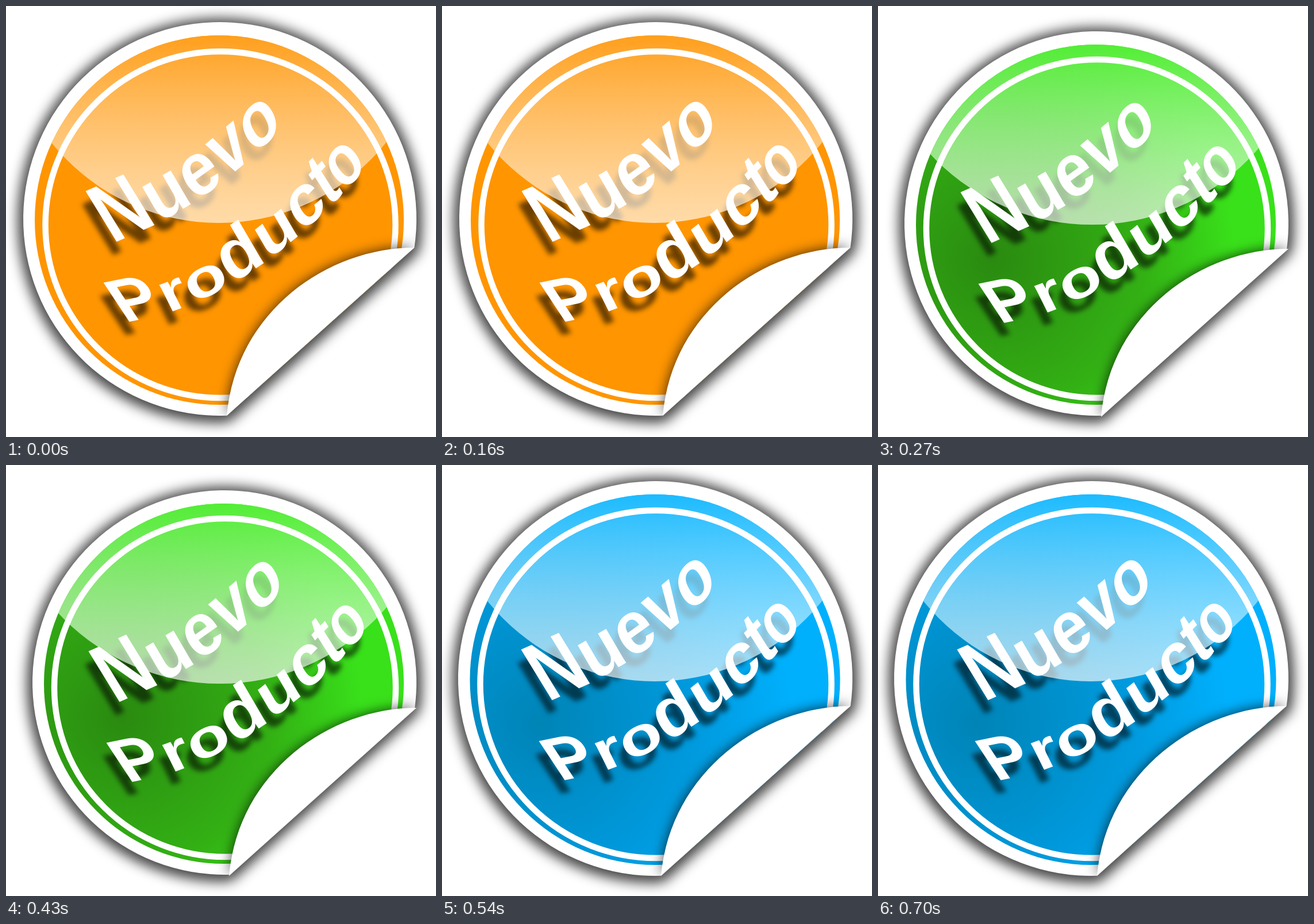
An HTML page with a canvas for the animation above (810 ms loop, 748x749 px).

```html
<!DOCTYPE html>
<html lang="es">
<head>
<meta charset="utf-8">
<title>Nuevo Producto</title>
<style>
html, body { margin: 0; width: 100%; height: 100%; overflow: hidden; background: #fff; }
canvas { display: block; }
</style>
</head>
<body>
<canvas id="stage" width="748" height="749"></canvas>
<script>
const ctx = document.getElementById('stage').getContext('2d');
const HOLD = 270;
const FONT = 'bold 100px "Liberation Sans", Arial, sans-serif';
const CAP = 68.8; // cap height at 100px

// disc, face, gloss: [x, y, r]; ring: [x, y, rx, ry]; curl: its two tips
const stickers = [
  { disc: [372, 370, 342], face: [371, 372, 321], ring: [373, 380, 304.5, 301],
    gloss: [370, 4, 373], curl: [[710, 420], [384, 712]], shift: [0, 0],
    glow: [200, 440, 420], colors: ['#ff9500', '#ff9500', '#ff9500'], shine: '#ffa01f' },
  { disc: [380, 378, 334], face: [379, 380, 313], ring: [381, 387, 297, 294],
    gloss: [372, -3.5, 383.5], curl: [[714, 422], [388, 714]], shift: [5, 2],
    glow: [200, 440, 420], colors: ['#2a8a10', '#33b014', '#39e11a'], shine: '#55ef38' },
  { disc: [371, 371, 343], face: [370.5, 373, 322], ring: [372, 381, 305.5, 302],
    gloss: [370, 3, 373], curl: [[710, 419], [381, 714]], shift: [-1, -1],
    glow: [170, 450, 440], colors: ['#0084b6', '#009ade', '#00b0fd'], shine: '#1fbcff' },
];

// base: cubic baseline; stems: downward cap-height vector of each letter
const words = [
  { text: 'Nuevo',
    base: [[184, 412], [303, 368], [400, 297], [482, 209]],
    stems: [[54, 88], [45, 77], [46, 75], [46, 80], [42, 76]] },
  { text: 'Producto',
    base: [[207, 548], [372, 534], [540, 384], [628, 278]],
    stems: [[45, 68], [30, 60], [29, 57], [42, 72], [37, 63], [42, 70], [47, 74], [50, 64]] },
];

function cubic(points, t) {
  const s = 1 - t;
  const at = i => {
    const [a, b, c, d] = points.map(p => p[i]);
    return [
      s * s * s * a + 3 * s * s * t * b + 3 * s * t * t * c + t * t * t * d,
      3 * (s * s * (b - a) + 2 * s * t * (c - b) + t * t * (d - c)),
    ];
  };
  const [x, dx] = at(0), [y, dy] = at(1);
  return { x, y, dx, dy };
}

function drawWord({ text, base, stems }) {
  ctx.font = FONT;
  ctx.textAlign = 'center';
  const widths = [...text].map(c => ctx.measureText(c).width);
  const total = widths.reduce((a, b) => a + b);
  let start = 0;
  widths.forEach((width, i) => {
    const p = cubic(base, (start + width / 2) / total);
    const [sx, sy] = stems[i];
    ctx.save();
    ctx.transform(p.dx / total, p.dy / total, sx / CAP, sy / CAP, p.x, p.y);
    ctx.fillText(text[i], 0, 0);
    ctx.restore();
    start += width;
  });
}

function drawText([dx, dy]) {
  ctx.save();
  ctx.translate(dx, dy);
  words.forEach(drawWord);
  ctx.restore();
}

// Draws only the shadow: the shape itself lies outside the stage.
function cast(alpha, blur, dx, dy, draw) {
  const away = 2000;
  ctx.save();
  ctx.shadowColor = `rgba(0,0,0,${alpha})`;
  ctx.shadowBlur = blur;
  ctx.shadowOffsetX = dx + away;
  ctx.shadowOffsetY = dy;
  ctx.translate(-away, 0);
  ctx.fillStyle = ctx.strokeStyle = '#000';
  draw();
  ctx.restore();
}

function circle([x, y, r]) {
  const path = new Path2D();
  path.arc(x, y, r, 0, 2 * Math.PI);
  return path;
}

function discPath([x, y, r], [a, b]) {
  const angle = p => Math.atan2(p[1] - y, p[0] - x);
  const path = new Path2D();
  path.arc(x, y, r, angle(b), angle(a));
  path.closePath();
  return path;
}

function curlPath([[ax, ay], [bx, by]]) {
  const path = new Path2D();
  path.moveTo(ax, ay);
  path.bezierCurveTo(ax - 150, ay, bx + 16, by - 182, bx, by);
  path.closePath();
  return path;
}

function draw(s) {
  const disc = discPath(s.disc, s.curl), face = circle(s.face), curl = curlPath(s.curl);
  ctx.fillStyle = '#fff';
  ctx.fillRect(0, 0, 748, 749);

  cast(0.85, 25, 0, 3, () => {
    ctx.lineWidth = 11;
    ctx.lineJoin = 'round';
    ctx.stroke(disc);
    ctx.fill(disc);
  });
  ctx.fill(disc);

  ctx.save();
  ctx.clip(disc);
  const [gx, gy, gr] = s.glow;
  const paint = ctx.createRadialGradient(gx, gy, 0, gx, gy, gr);
  s.colors.forEach((c, i) => paint.addColorStop([0, 0.62, 1][i], c));
  ctx.fillStyle = paint;
  ctx.fill(face);

  ctx.beginPath();
  ctx.ellipse(...s.ring, 0, 0, 2 * Math.PI);
  ctx.strokeStyle = '#fff';
  ctx.lineWidth = 10.5;

  cast(0.58, 9, -6, 23, () => drawText(s.shift));

  ctx.save();
  ctx.clip(face);
  const shine = ctx.createLinearGradient(0, s.face[1] - s.face[2], 0, s.gloss[1] + s.gloss[2]);
  shine.addColorStop(0, s.shine + 'e6');
  shine.addColorStop(1, '#ffffffa8');
  ctx.fillStyle = shine;
  ctx.fill(circle(s.gloss));
  ctx.restore();

  ctx.stroke();
  cast(0.75, 22, 0, 0, () => ctx.fill(curl));
  ctx.restore();

  ctx.fillStyle = '#fff';
  drawText(s.shift);
  ctx.fill(curl);
}

let shown = -1;
function tick() {
  const i = Math.floor(performance.now() / HOLD) % stickers.length;
  if (i !== shown) draw(stickers[shown = i]);
  requestAnimationFrame(tick);
}
tick();
</script>
</body>
</html>
```
